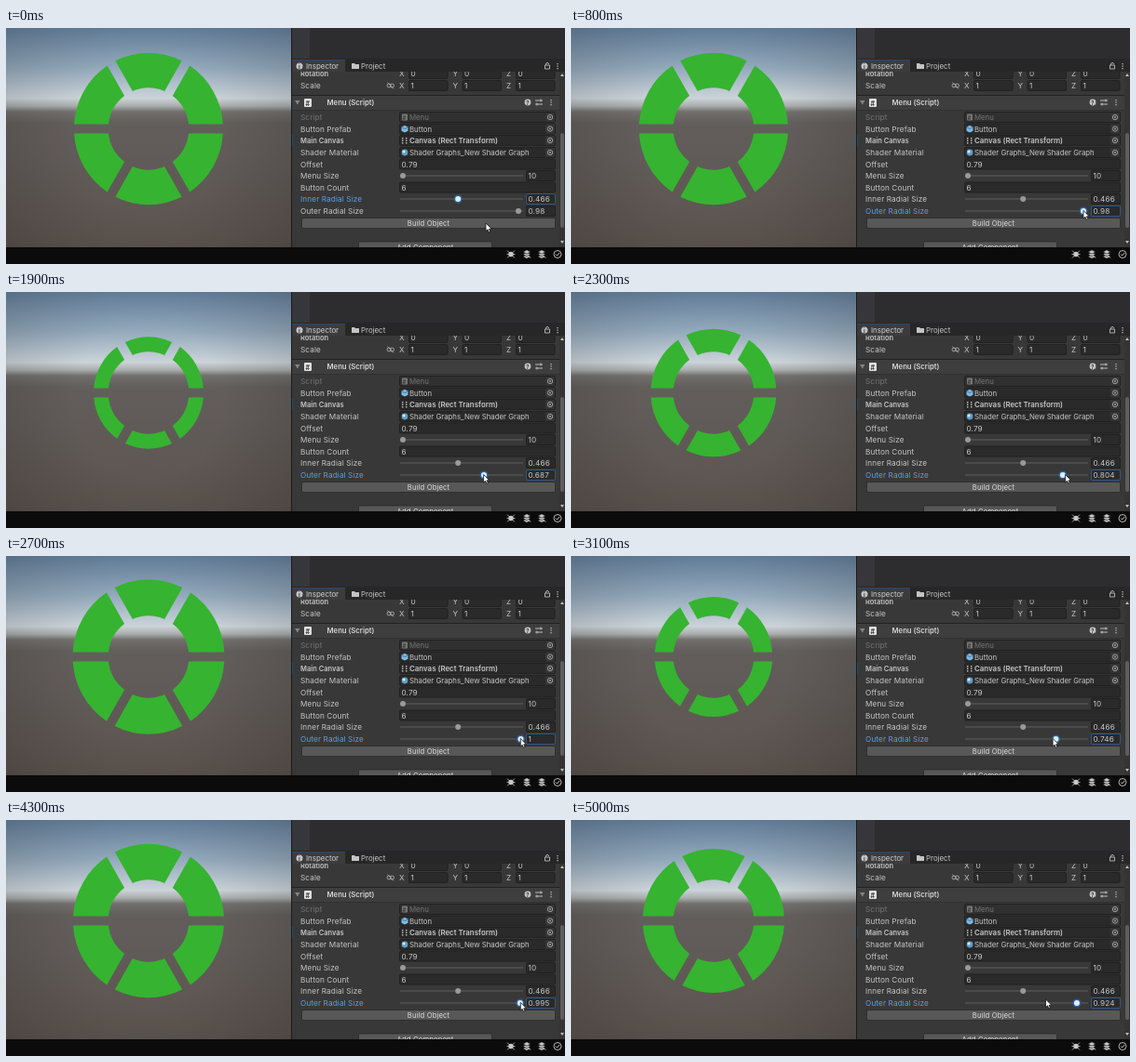
Animation of 600 by 254 pixels, one loop 5.2 s. Source, as an HTML page with a canvas:

```html
<!DOCTYPE html>
<html lang="en">
<head>
<meta charset="utf-8">
<title>Radial menu inspector</title>
<style>
html, body { margin: 0; width: 100%; height: 100%; overflow: hidden; background: #0b0b0b; }
canvas { display: block; }
</style>
</head>
<body>
<canvas id="stage" width="600" height="254"></canvas>
<script>
const c = document.getElementById('stage').getContext('2d');
const LOOP = 5200, STEP = 100, INNER = .466;
const TEXT = '#c6c6c6', ICON = '#bdbdbd', BLUE = '#5a9fe6';
const FIELD = '#2a2a2a', EDGE = '#212121', PANEL = '#383838';

// The drag swings between these turning points: time in ms, outer size.
const TURNS = [[950, .98], [2000, .68], [2700, 1], [3400, .584], [4370, 1], [LOOP, .912]];

const clamp = p => Math.min(1, Math.max(0, p));
const ease = p => (1 - Math.cos(Math.PI * clamp(p))) / 2;
const mix = (a, b, p) => a + (b - a) * p;
const handleX = size => 552.5 - 126 * (1 - size);
const radius = size => 81.5 - 71.6 * (1 - size);
const row = i => 96 + Math.round(i * 25.2) / 2;

function outerSize(t) {
  return TURNS.slice(1).reduce((size, [end, value], i) => {
    const begin = TURNS[i][0];
    return mix(size, value, ease((t - begin) / (end - begin)));
  }, TURNS[0][1]);
}

// The pointer walks to the handle, runs slightly ahead of it, then slips away.
function pointerAt(t) {
  const arrive = ease(t / 600), leave = ease((t - 4800) / 200);
  const x = mix(515, handleX(outerSize(t + 30)), arrive) - 33 * leave;
  return [x, mix(210, 196.5, arrive) - 3.5 * leave];
}

function paint(fill, stroke, width = 1) {
  if (fill) { c.fillStyle = fill; c.fill(); }
  if (stroke) { c.strokeStyle = stroke; c.lineWidth = width; c.stroke(); }
}

function rect(x, y, w, h, fill, stroke, r = 0) {
  c.beginPath();
  c.roundRect(x, y, w, h, r);
  paint(fill, stroke);
}

function circle(x, y, r, fill, stroke) {
  c.beginPath();
  c.arc(x, y, r, 0, 7);
  paint(fill, stroke, .9);
}

function path(x, y, d, fill, stroke, width) {
  c.save();
  c.translate(x, y);
  const shape = new Path2D(d);
  if (fill) { c.fillStyle = fill; c.fill(shape); }
  if (stroke) { c.strokeStyle = stroke; c.lineWidth = width || 1; c.stroke(shape); }
  c.restore();
}

function text(s, x, y, color = TEXT, bold = false, size = 8.2, spacing = .12) {
  c.font = `${bold ? 600 : 400} ${size}px Inter, sans-serif`;
  c.letterSpacing = spacing + 'px';
  c.fillStyle = color;
  c.fillText(s, x, y + 3);
}

function moreDots(x, y) {
  for (const d of [-2.5, 0, 2.5]) rect(x - .6, y + d - .6, 1.3, 1.3, ICON);
}

function label(s, y, color, bold) {
  text(s, 316, y, color, bold, bold ? 7.5 : 8.2, bold ? 0 : .12);
}

function field(x, y, w, s, edge = EDGE) {
  rect(x + .5, y - 5.5, w - 1, 11, FIELD, edge, 1.5);
  text(s, x + 2.5, y);
}

function objectField(y, name, s, { bold, dim } = {}) {
  const color = dim ? '#747474' : TEXT;
  label(name, y, color, bold);
  rect(422.5, y - 5.5, 167, 11, dim ? '#303030' : FIELD, EDGE, 1.5);
  text(s, 433, y, color, bold, bold ? 7.9 : 7.8, 0);
  rect(579, y - 5, 10, 10, '#353535');
  circle(584, y, 2.7, null, '#a8a8a8');
  circle(584, y, 1, '#a8a8a8');
}

function slider(y, name, value, x, active) {
  label(name, y, active ? BLUE : TEXT);
  rect(423, y - .6, 132, 1.2, '#5e5e5e');
  if (active) circle(x, y, 4.5, '#2f5f98');
  circle(x, y, 3, active ? '#dceefb' : '#999');
  field(558, y, 32, String(+value.toFixed(3)), active ? '#35567f' : EDGE);
}

function scene() {
  const sky = c.createLinearGradient(0, 0, 0, 84);
  sky.addColorStop(0, '#67839f');
  sky.addColorStop(.5, '#93a9bc');
  sky.addColorStop(.9, '#cbd3d8');
  sky.addColorStop(1, '#a9acad');
  rect(0, 0, 306, 84, sky);
  const ground = c.createLinearGradient(0, 84, 0, 236);
  ground.addColorStop(0, '#a9acad');
  ground.addColorStop(.04, '#726f6d');
  ground.addColorStop(.12, '#625e5c');
  ground.addColorStop(1, '#5d544f');
  rect(0, 84, 306, 152, ground);
  const shade = c.createRadialGradient(153, 118, 80, 153, 118, 220);
  shade.addColorStop(0, '#0000');
  shade.addColorStop(1, '#0003');
  rect(0, 0, 306, 236, shade);
}

function ring(outer, inner) {
  const R = radius(outer), r = radius(inner), wedge = Math.PI / 3;
  const a = Math.asin(5 / R), b = Math.asin(5 / r);
  c.save();
  c.translate(153, 108.5);
  c.scale(1, 1.02);
  c.beginPath();
  for (let k = 0; k < 6; k++) {
    const from = k * wedge, to = from + wedge;
    c.moveTo(R * Math.cos(from + a), R * Math.sin(from + a));
    c.arc(0, 0, R, from + a, to - a);
    c.arc(0, 0, r, to - b, from + b, true);
    c.closePath();
  }
  paint('#36b331');
  c.restore();
}

function vectorRow(y, name, value, bold) {
  label(name, y, TEXT, bold);
  [...'XYZ'].forEach((axis, i) => {
    const x = 422 + i * 57.5;
    text(axis, x, y);
    field(x + 10, y, 42.5, value);
  });
}

function tabs() {
  rect(307, 0, 293, 34, '#2d2c2f');
  rect(307, 0, 19, 33, '#37363a');
  rect(307, 33, 293, 14, '#272727');
  rect(307, 34, 57, 13, '#3c3c3c');
  rect(307, 34, 57, 1, '#2c4a6b');
  circle(315, 41, 3.5, '#c4c4c4');
  text('i', 314, 41, '#333', true, 6.5, 0);
  text('Inspector', 322, 41, '#d0d0d0', false, 7.9, 0);
  path(371, 38, 'M0 0h3l1 1h4v5h-8z', '#c4c4c4');
  text('Project', 381, 41, TEXT, false, 7.9, 0);
  path(578.5, 40, 'M0 0h5v4h-5zM1 0v-1a1.5 1.5 0 0 1 3 0', null, ICON, .9);
  moreDots(592, 41);
}

function header(y) {
  rect(307, y - 8, 287, 16, '#3e3e3e');
  rect(307, y - 8, 287, 1, '#222');
  rect(307, y + 8, 287, 1, '#303030');
  path(310, y - 2, 'M0 0h5.5l-2.7 4.5z', '#858585');
  rect(320, y - 4, 8, 9, '#e0e0e0', null, 1);
  text('#', 321.5, y + .5, '#333', true, 7, 0);
  text('Menu (Script)', 344.5, y, '#d6d6d6', true, 7.7, 0);
  circle(560, y, 3.4, '#c4c4c4');
  text('?', 558.1, y, '#333', true, 6.5, 0);
  path(568, y, 'M0-2h8M0 2h8M6-3.5v3M2 .5v3', null, ICON);
  moreDots(585, y);
}

function statusIcons(y) {
  const ink = '#c8c8c8';
  path(542, y, 'M-4-4l8 8M4-4l-8 8M-4.5 0h9', null, ink, .8);
  circle(542, y, 2.7, ink);
  for (const x of [559, 575]) {
    for (const d of [2.5, 0, -2.5]) path(x, y + d, 'M-4 0l4-2.2 4 2.2-4 2.2z', ink, '#111', .6);
    path(x, y, 'M1 1l3 3', null, ink);
  }
  circle(592, y, 4, null, ink);
  path(592, y, 'M-2 0l1.5 1.5 2.7-3', null, ink);
}

function scrollbar() {
  rect(594, 47, 6, 189, '#343434');
  rect(595, 113, 4, 102, '#5e5e5e', null, 2);
  path(597, 51, 'M-2 1h4l-2-3z', ICON);
  path(597, 230, 'M-2-1h4l-2 3z', ICON);
}

function button(s, x, y, w) {
  rect(x + .5, y - 5.5, w - 1, 11, '#585858', '#303030', 1.5);
  c.textAlign = 'center';
  text(s, x + w / 2, y, '#dedede', false, 7.7);
  c.textAlign = 'left';
}

function inspector(outer, outerActive) {
  rect(306, 0, 294, 236, PANEL);
  vectorRow(49, 'Rotation', '0', true);
  vectorRow(62, 'Scale', '1');
  for (const x of [411, 414.5]) circle(x, 62, 2, null, '#aaa');
  path(409.5, 58.5, 'M0 0l6.5 7', null, '#aaa', .8);
  header(80);

  objectField(row(0), 'Script', 'Menu', { dim: true });
  rect(425, row(0) - 3.5, 6, 7, '#777', null, 1);
  text('#', 425.8, row(0), '#303030', true, 5.5, 0);
  objectField(row(1), 'Button Prefab', 'Button');
  path(428, row(1), 'M0-3.7l3.5 2v4L0 4l-3.5-1.7v-4z', '#79bbe8');
  path(428, row(1), 'M-3.5-1.7L0 0l3.5-1.7', null, '#315f83', .7);
  objectField(row(2), 'Main Canvas', 'Canvas (Rect Transform)', { bold: true });
  for (const x of [425, 429]) for (const d of [-3, -.5, 2]) rect(x, row(2) + d, 1.4, 1.4, ICON);
  rect(307, row(2) - 6, 1, 12, '#234f70');
  objectField(row(3), 'Shader Material', 'Shader Graphs_New Shader Graph');
  circle(428, row(3), 3.4, '#5d9fc9');
  circle(427, row(3) - 1, 1.5, '#d5e9f4');

  label('Offset', row(4));
  field(422, row(4), 168, '0.79');
  slider(row(5), 'Menu Size', 10, 426, false);
  label('Button Count', row(6));
  field(422, row(6), 168, '6');
  slider(row(7), 'Inner Radial Size', INNER, handleX(INNER), !outerActive);
  slider(row(8), 'Outer Radial Size', outer, handleX(outer), outerActive);
  button('Build Object', 317, 210, 273);
  button('Add Component', 378, 235.5, 144);

  scrollbar();
  tabs();
  rect(306, 0, 1, 236, '#1b1b1b');
}

function draw(now) {
  const t = Math.floor(now % LOOP / STEP) * STEP;
  const shown = Math.min(t, LOOP - 2 * STEP);
  const outer = outerSize(shown);
  scene();
  ring(outer, INNER);
  inspector(outer, shown >= 600);
  rect(0, 236, 600, 18, '#0b0b0b');
  statusIcons(243.5);
  path(...pointerAt(shown), 'M0 0v8.6l2-1.8 1.3 3 1.5-.7-1.3-2.8 2.7-.1z', '#fff', '#161616', .8);
}

const start = performance.now();
function tick() {
  draw(performance.now() - start);
  requestAnimationFrame(tick);
}
tick();
</script>
</body>
</html>
```
